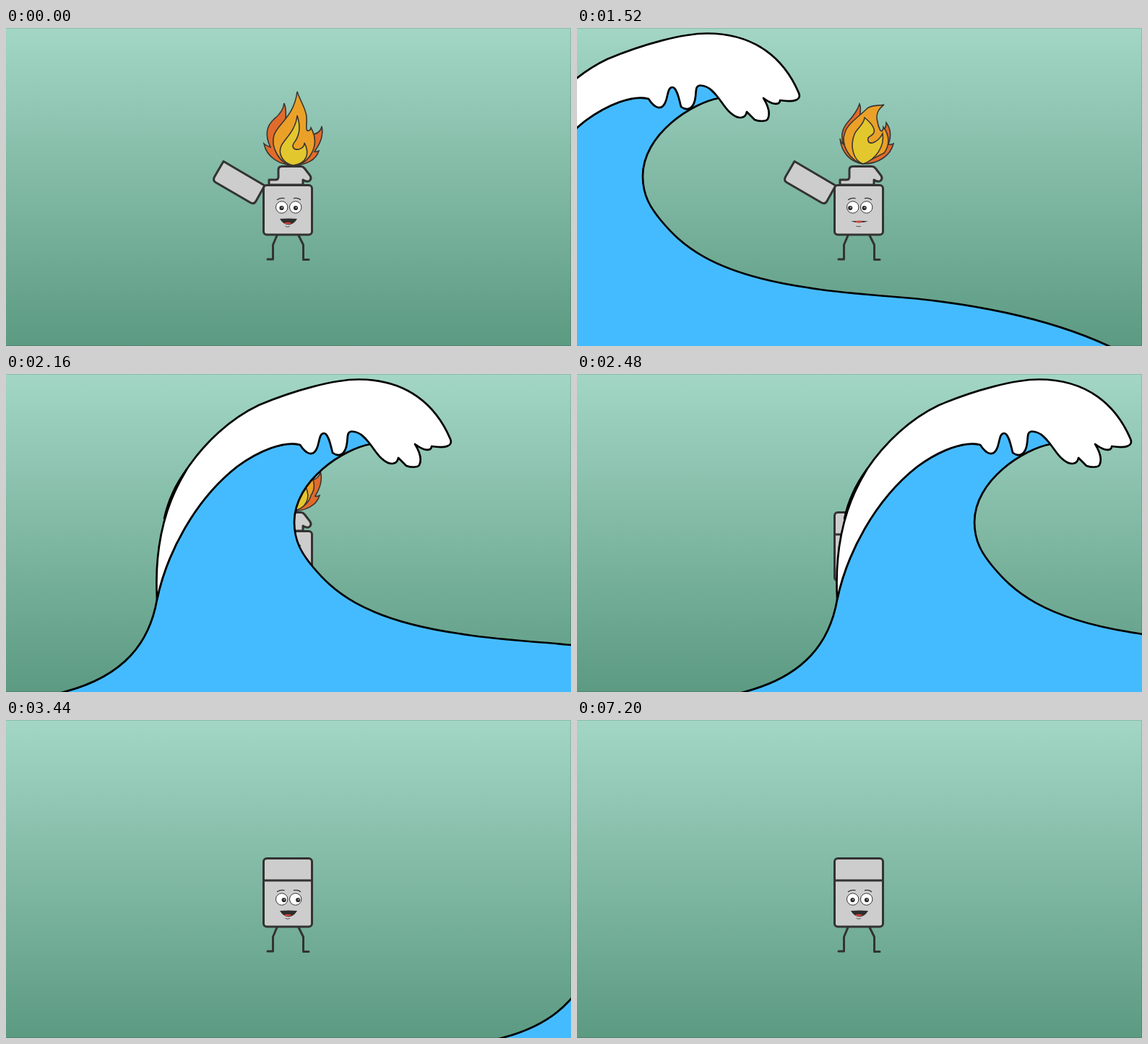
Recreate the animation shown at these times as an HTML page. Size 782 px wide and 440 px high, loop 8.4 s.

```html
<!DOCTYPE html>
<html lang="en">
<head>
<meta charset="utf-8">
<title>Lighter and wave</title>
<style>
  html, body { margin: 0; width: 100%; height: 100%; overflow: hidden; }
  svg { display: block; width: 100%; height: 100%; }
  .metal { fill: #cdcdcd; stroke: #333; stroke-width: 3; stroke-linejoin: round; stroke-linecap: round; }
  .line { fill: none; stroke: #333; stroke-linecap: round; }
  .flame path { stroke: #3a3632; stroke-width: 1.6; }
  .wave path { stroke: #000; stroke-width: 2.7; stroke-linejoin: round; }
</style>
</head>
<body>
<svg viewBox="0 0 782 440">
  <defs>
    <linearGradient id="sky" x2="0" y2="1">
      <stop stop-color="#a3d6c5"/>
      <stop offset="1" stop-color="#5c9a82"/>
    </linearGradient>
  </defs>
  <rect width="782" height="440" fill="url(#sky)"/>
  <path d="M0 .5H781.5V439.5H0" fill="none" stroke="#000" stroke-opacity=".13"/>

  <path class="metal" style="fill:none" d="M375 287L369.5 300V320H362M405 287L411.5 300V320.5H419"/>

  <g id="open">
    <g class="flame">
      <path id="outer" fill="#e16b2b"/>
      <path id="middle" fill="#eba127"/>
      <path id="inner" fill="#e3c72f"/>
    </g>
    <path class="metal" d="M364 217V210H373Q377 210 377 206V196Q377 191.500 382 191.500H408Q411 191.500 413 194L420 203Q424 208 420 211.500Q416 213.500 411 210V217Z"/>
    <path class="metal" d="M358 218L301 184.500L288.500 206Q286 211 290 213.500L339 242Q343.500 244 346 239.500Z"/>
    <rect class="metal" x="356.500" y="217.500" width="67" height="68.500" rx="4.500"/>
  </g>
  <g id="closed">
    <rect class="metal" x="356.500" y="191.500" width="67" height="94.500" rx="4.500"/>
    <path class="metal" d="M357 222H423"/>
  </g>

  <g fill="#fff" stroke="#333">
    <circle cx="381.700" cy="248" r="8.200"/>
    <circle cx="400.700" cy="248" r="8.200"/>
  </g>
  <g id="pupils">
    <g id="pupil">
      <circle r="3.100" fill="#2b2b2b"/>
      <circle cx=".6" cy="-.5" r=".9" fill="#bbb"/>
    </g>
    <use href="#pupil" x="19.500"/>
  </g>
  <path class="line" stroke-width="1.300" d="M375.500 237.500Q380 234.500 385 235.700M398.500 235.700Q404 234.500 407.500 237.500"/>
  <path id="mouth" fill="#2d2d2d"/>
  <path id="tongue" fill="#d8433a"/>
  <path id="chin" class="line" stroke-width=".8"/>

  <g id="wave" class="wave">
    <path fill="#45bbff" d="M70 443L80 440C165 418 199 370 209 312C222 250 260 175 320 128C350 106 385 92 407 98L440 72H480L505 97C468 103 399 147 399 205C399 232 410 249 424 266C450 297 490 339 626 359C660 365 700 368 736 371C850 379 960 401 1044 440L1060 448V460H70Z"/>
    <path fill="#fff" d="M209 312C205 240 220 180 250 132C275 95 310 62 350 43C400 22 455 7.500 488 7.500C555 7.500 595 43 615 90C619 100 608 103 589 100C589 107 579 107 566 97C574 110 575 120 572 126C569 130 559 129 554 127Q549 122 543 116C541 126 531 127 520 117C508 107 498 79 478 79.500C472 80 473 87 472 95C470 113 460 115 452 109C449 97 446 82 440 82C434 82 434 92 431 101C426 115 416 112 407 98C385 92 350 106 320 128C260 175 222 250 209 312Z"/>
    <path d="M250 132Q227 163 219 200Q230 165 250 132Z"/>
  </g>
</svg>
<script>
const LOOP = 8400, STEP = 80, SHUT = 2240;
const el = id => document.getElementById(id);
const mix = (a, b, k) => a + (b - a) * k;

// Keys are [time, value] pairs, joined linearly.
function track(keys, t) {
  const i = keys.findIndex(k => k[0] > t);
  if (i < 0) return keys[keys.length - 1][1];
  if (i === 0) return keys[0][1];
  const [t0, a] = keys[i - 1], [t1, b] = keys[i];
  return mix(a, b, (t - t0) / (t1 - t0));
}

// Blends two paths with the same commands.
function blend([a, b], k) {
  const ends = b.match(/\d+/g);
  let i = 0;
  return a.replace(/\d+/g, n => mix(+n, +ends[i++], k).toFixed(2));
}

const flame = {
  outer: [
    "M396 190C380 189 361 180 357 160C360 163 363 164 366 165C357 146 362 134 371 126C380 119 384 112 385 104C389 114 387 121 387 128L400 134L421 148C431 147 436 142 437 136C440 150 434 161 427 171C429 172 431 171 433 170C429 183 415 190 396 190Z",
    "M396 188C380 186 366 174 364 153C365 157 367 160 369 161C364 148 368 138 375 130C384 120 389 112 391 105C394 111 392 117 391 124L404 134L420 147C426 142 428 136 428 131C434 139 435 150 431 161C434 162 436 161 438 160C434 176 418 188 396 188Z"
  ],
  middle: [
    "M396 190C378 188 366 164 371 148C376 133 399 122 403 88C408 103 416 113 416 124C417 133 414 138 417 142Q421 143 422 138C430 152 428 165 422 175C416 185 407 190 396 190Z",
    "M396 188C378 184 364 162 371 144C375 132 391 122 402 111C409 106 417 108 425 106C416 113 413 120 416 130C417 136 419 140 421 145Q424 142 424 137C433 149 433 162 425 173C417 183 407 187 396 188Z"
  ],
  inner: [
    "M397 190C383 187 376 174 381 163C386 153 401 142 403 121C408 136 407 147 400 157C394 164 398 169 405 168Q413 166 413 159C421 174 416 188 397 190Z",
    "M396 188C383 184 377 164 384 147C387 139 397 134 398 124C408 132 417 143 407 149C400 152 402 160 409 159Q418 156 423 146C426 163 414 182 396 188Z"
  ]
};

const flicker = [[0, 0], [320, 1], [400, 1], [500, 0]];
const drift = [[0, -1052], [560, -778], [1520, -308], [2160, 0], [2880, 340], [3520, 644], [3680, 720]];
const lookX = [[80, 381.5], [400, 378.2], [2160, 378.2], [2480, 384.7], [3920, 384.7], [4240, 381.5]];
const lookY = [[3920, 249], [4240, 244.7], [6400, 244.7], [7200, 249]];
const smile = [[880, 1], [1440, 0], [2560, 0], [3200, 1]];

function face(t) {
  el("pupils").setAttribute("transform", `translate(${track(lookX, t)} ${track(lookY, t)})`);
  const s = track(smile, t);
  const top = mix(267.2, 264, s), low = mix(269.2, 271.2, s), bow = low + mix(0, 1, s);
  el("mouth").setAttribute("d",
    `M379 ${top}Q391 ${top - .8} 403 ${top}Q398 ${bow} 391 ${bow}Q384 ${bow} 379 ${top}Z`);
  el("tongue").setAttribute("d",
    `M384.500 ${low - 1.2}Q390 ${low - 3.5} 395.500 ${low - 1.2}Q390 ${low + 1.8} 384.500 ${low - 1.2}Z`);
  el("chin").setAttribute("d", `M387 274.500Q390 ${mix(275, 276.5, s)} 392.500 274.500`);
}

function draw(now) {
  const t = Math.floor(now % LOOP / STEP) * STEP;
  const k = track(flicker, t % 560);
  for (const id in flame) el(id).setAttribute("d", blend(flame[id], k));
  el("open").style.display = t < SHUT ? "" : "none";
  el("closed").style.display = t < SHUT ? "none" : "";
  el("wave").setAttribute("transform", `translate(${track(drift, t)} 0)`);
  face(t);
}

const start = performance.now();
function tick() {
  draw(performance.now() - start);
  requestAnimationFrame(tick);
}
tick();
</script>
</body>
</html>
```
